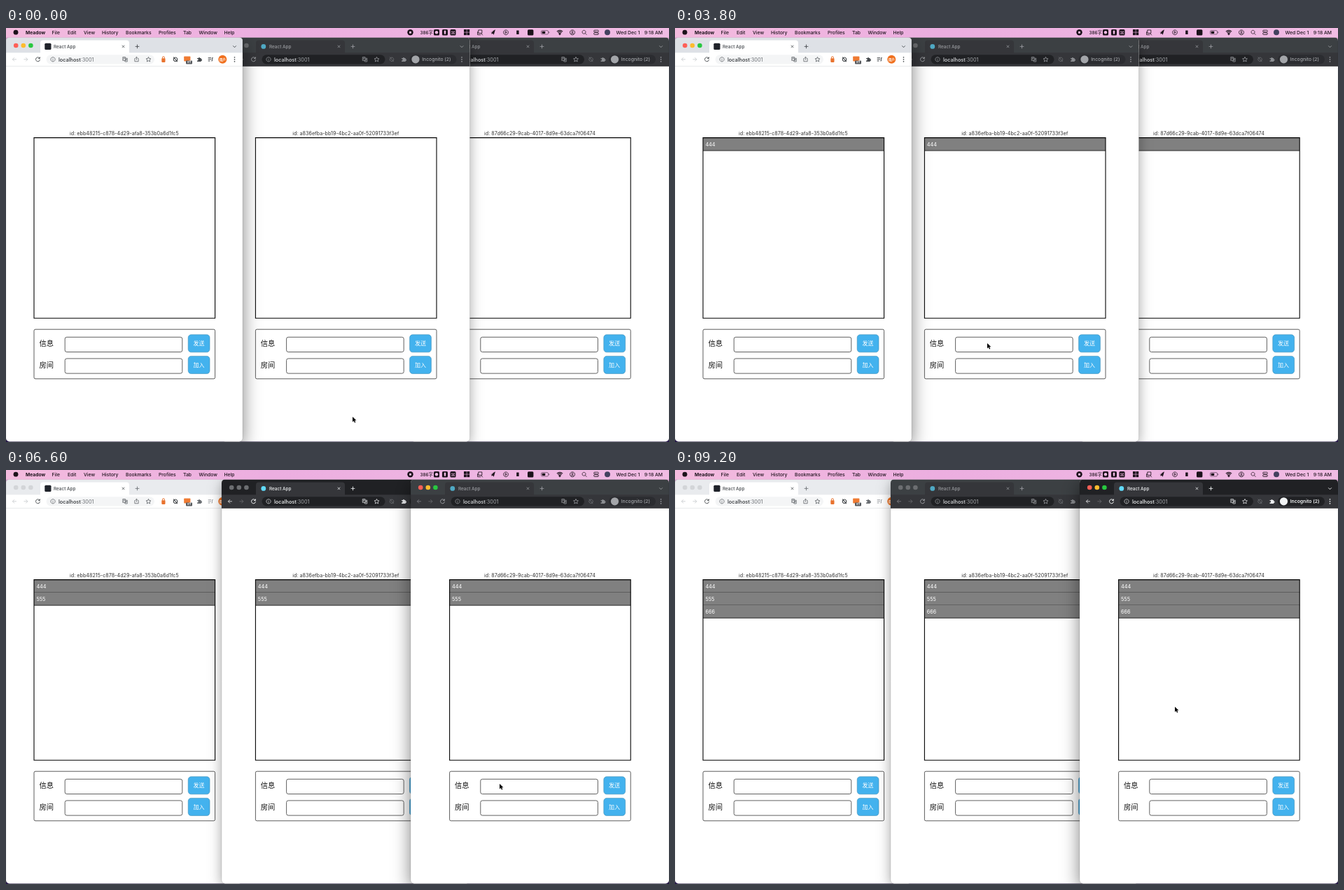
These frames come from a looping animation (947 by 591 pixels, 9.9 s). An HTML page with a canvas:

```html
<!DOCTYPE html>
<html lang="en">
<head>
<meta charset="utf-8">
<title>Chat rooms</title>
<style>
html, body { margin: 0; width: 100%; height: 100%; overflow: hidden; background: #fff; }
canvas { display: block; width: 947px; height: 591px; }
</style>
</head>
<body>
<canvas id="stage"></canvas>
<script>
const W = 947, H = 591, LOOP = 9900, STEP = 50;
const UI = 'Inter, Roboto, sans-serif';
const CJK = '"Noto Sans CJK SC", "Noto Sans CJK", sans-serif';
const canvas = document.getElementById('stage');
const dpr = window.devicePixelRatio || 1;
canvas.width = W * dpr;
canvas.height = H * dpr;
const ctx = canvas.getContext('2d');

// page: left offset of the content; times are in ms
const windows = [
  { x: 0, right: 338, page: 0, light: true, id: 'ebb48215-c878-4d29-afa8-353b0a6d1fc5',
    front: -1000, focus: 1100, blink: 1450, hide: 1750, keys: [1750, 1950, 2050], digit: '4', send: 2500 },
  { x: 308, right: 662.5, page: 316.4, id: 'a836efba-bb19-4bc2-aa0f-52091733f3ef',
    front: 3850, focus: 4250, blink: 4650, hide: 4650, keys: [4650, 4850, 4950], digit: '5', send: 5600 },
  { x: 578, right: 947, page: 593.6, id: '87d66c29-9cab-4017-8d9e-63dca7f06474',
    front: 6550, focus: 6950, blink: 7250, hide: 7550, keys: [7700, 7800, 7900], digit: '6', send: 8400 }
];
const suggestions = ['123', '1234', '33333333', '22'];

// pointer path: time, x, y
const path = [
  [0, 495, 555], [300, 420, 425], [400, 420, 425], [950, 121, 444], [1050, 121, 444],
  [1250, 112, 451], [2050, 112, 451], [2250, 270, 457], [2350, 270, 457], [2450, 272, 450.5],
  [3100, 272, 450.5], [3400, 320, 440], [3500, 320, 440], [3800, 446, 450], [5000, 446, 450],
  [5350, 592.5, 448.5], [6050, 592.5, 448.5], [6450, 705, 448], [8050, 705, 448],
  [8250, 866, 448], [9050, 866, 448], [9200, 714, 338], [LOOP, 714, 338]
];

const icons = {
  back: 'M13.5 8H3M8 3L3 8l5 5',
  forward: 'M2.5 8H13M8 3l5 5-5 5',
  reload: 'M12.4 4.8A5.4 5.4 0 1 0 13.4 8.6M13.2 1.8v4h-4',
  info: 'M8 2a6 6 0 1 0 .1 0M8 7.3v4M8 4.6v1',
  star: 'M8 2l1.8 4 4.2.4-3.2 2.9 1 4.2L8 11.3 4.2 13.5l1-4.2L2 6.4 6.2 6z',
  share: 'M5 6H3v8h10V6h-2M8 10V2M5 4.5l3-3 3 3',
  translate: 'M2 2h7v9H2zM9 5h5v9H8l-1-3M4 5h3M5.5 4v1L4 8.5M10 8h3M11.5 7.5L10 12',
  puzzle: 'M2.5 5H6a2 2 0 1 1 4 0h3v3.2a2 2 0 1 1 0 3.8v2.5H2.5V11a2 2 0 1 0 0-3.6z',
  slash: 'M8 3a5 5 0 1 0 .1 0M3 2l10 12',
  list: 'M2 4h8M2 8h8M2 12h5M12.5 4v8M12.5 4H15M10.5 12h2',
  chevron: 'M3.5 6L8 10.5 12.5 6',
  close: 'M4.2 4.2l7.6 7.6M11.8 4.2l-7.6 7.6',
  plus: 'M8 2.5v11M2.5 8h11',
  plane: 'M1 9L15 1l-4 13-3-4-2 3-1-4 6-5z',
  overlap: 'M4 2h9v8H4zM2 6v8h8M11 11l4 4',
  play: 'M8 1.5a6.5 6.5 0 1 0 .1 0M6.5 5v6l4.5-3z',
  user: 'M8 1.5a6.5 6.5 0 1 0 .1 0M8 4.5a2 2 0 1 0 .1 0M4 12q4-4 8 0',
  search: 'M7 2a5 5 0 1 0 .1 0M10.5 10.5L15 15',
  wifi: 'M1 6q7-6 14 0M3.5 8.5q4.5-4 9 0M6 11q2-2 4 0l-2 2.5z',
  toggles: 'M4 2h8a2.5 2.5 0 0 1 0 5H4a2.5 2.5 0 0 1 0-5M4 9h8a2.5 2.5 0 0 1 0 5H4a2.5 2.5 0 0 1 0-5M4 4.5h1M11 11.5h1'
};

function icon(name, x, y, color, size = 8.4, fill = false, weight = 1.5) {
  const shape = new Path2D(icons[name]);
  ctx.save();
  ctx.translate(x - size / 2, y - size / 2);
  ctx.scale(size / 16, size / 16);
  ctx.lineWidth = weight;
  ctx.strokeStyle = ctx.fillStyle = color;
  if (fill) ctx.fill(shape); else ctx.stroke(shape);
  ctx.restore();
}

function text(s, x, y, size, color, weight = 400, align = 'left', family = UI) {
  ctx.font = `${weight} ${size}px ${family}`;
  ctx.textAlign = align;
  ctx.fillStyle = color;
  ctx.fillText(s, x, y);
}

function rect(x, y, w, h, color) {
  ctx.fillStyle = color;
  ctx.fillRect(x, y, w, h);
}

function box(x, y, w, h, r, fill, stroke, line = 1) {
  ctx.beginPath();
  ctx.roundRect(x, y, w, h, r);
  if (fill) { ctx.fillStyle = fill; ctx.fill(); }
  if (stroke) { ctx.strokeStyle = stroke; ctx.lineWidth = line; ctx.stroke(); }
}

function dot(x, y, r, color) {
  ctx.beginPath();
  ctx.arc(x, y, r, 0, Math.PI * 2);
  ctx.fillStyle = color;
  ctx.fill();
}

const depth = (i, t) => t >= windows[i].front ? windows[i].front : -1e4 * (i + 1);
const stackAt = t => [0, 1, 2].sort((a, b) => depth(a, t) - depth(b, t));
const inside = (p, x, y, w, h) => p.x >= x && p.x <= x + w && p.y >= y && p.y <= y + h;

function pointerAt(t) {
  const i = Math.max(1, path.findIndex(k => k[0] > t));
  const [t0, x0, y0] = path[i - 1], [t1, x1, y1] = path[i];
  const k = (t - t0) / (t1 - t0), e = k * k * (3 - 2 * k);
  return { x: x0 + (x1 - x0) * e, y: y0 + (y1 - y0) * e };
}

function drawMenuBar() {
  const g = ctx.createLinearGradient(0, 0, W, 0);
  g.addColorStop(0, '#f3bbde');
  g.addColorStop(0.4, '#ecaee0');
  g.addColorStop(1, '#f1bce4');
  rect(0, 0, W, 13.5, g);
  const ink = '#1c121b', y = 8.7;
  dot(14, 6.2, 3.4, ink);
  text('Meadow', 28, y, 6.7, ink, 700);
  const menus = { File: 65.5, Edit: 88, View: 111, History: 137, Bookmarks: 171,
    Profiles: 218, Tab: 253, Window: 275.5, Help: 311.5 };
  for (const name in menus) text(name, menus[name], y, 6.8, ink, 500);

  dot(577.5, 6.3, 4.2, ink);
  box(576, 4.8, 3, 3, 0.6, '#f1bce4');
  text('386字', 591.5, y, 6.4, ink, 500, 'left', 'Inter, ' + CJK);
  for (const x of [615, 627, 638.5]) box(x - 4, 2, 8, 8.6, 1.6, ink);
  dot(615, 6.3, 2.2, '#f1bce4');
  box(625.8, 3.4, 2.4, 5.4, 1, '#f1bce4');
  text('⌘', 638.5, 8.6, 6.2, '#f1bce4', 500, 'center', '"DejaVu Sans", sans-serif');
  for (const [dx, dy] of [[0, 0], [4.4, 0], [0, 4.4], [4.4, 4.4]]) rect(654 + dx, 2 + dy, 3.8, 3.8, ink);
  icon('overlap', 677, 6.3, ink, 9);
  icon('plane', 695, 6.3, ink, 9, true);
  icon('play', 714, 6.3, ink, 8.4);
  box(729.2, 3.5, 3.4, 5.6, 0.3, ink);
  box(745, 2.2, 8.4, 8.2, 1.5, ink);
  box(764.5, 3.6, 10, 5.4, 1.4, null, '#6d4f69', 0.8);
  box(765.7, 4.7, 4.5, 3.2, 0.6, ink);
  rect(775.3, 5.3, 0.9, 2, '#6d4f69');
  icon('wifi', 791, 6.3, ink, 9.5, false, 2);
  icon('user', 809, 6.3, ink, 8.6);
  icon('search', 826, 6.3, ink, 8);
  icon('toggles', 843, 6.3, ink, 8.4);
  dot(859, 6.3, 4, '#43415f');
  text('Wed Dec 1', 871.5, y, 6.8, ink, 500);
  text('9:18 AM', 938, y, 6.8, ink, 500, 'right');
}

function drawChrome(w, front, lit) {
  const { x, right, light } = w;
  const strip = light ? (lit ? '#dee1e6' : '#e9ebee') : (lit ? '#202124' : '#3c4043');
  const bar = light ? '#ffffff' : '#35363a';
  const pill = light ? '#f4f5f6' : '#202124';
  const ink = light ? (lit ? '#45494d' : '#6d7175') : (lit ? '#f1f3f4' : '#9a9ca0');
  const soft = light ? '#5f6368' : (lit ? '#d4d6d9' : '#94979b');
  const faint = light ? '#c4c7ca' : '#6b6d71';

  rect(x, 13, right - x, 23, strip);
  const lamps = front ? ['#fe5f57', '#febc2e', '#28c840'] : Array(3).fill(light ? '#d3d5d8' : '#6c6e71');
  lamps.forEach((c, i) => dot(x + 14.2 + i * 10.6, 25, 3.3, c));

  box(x + 49, 17.5, 127, 22, 4, bar);
  rect(x, 35.3, right - x, 19.2, bar);
  if (light) box(x + 55.3, 21.8, 9.2, 9.2, 1.5, '#20232a');
  else dot(x + 59.8, 26.4, 3.4, lit ? '#61dafb' : '#4fa9c4');
  text('React App', x + 68, 28.8, 6.4, light ? '#45494d' : ink, 500);
  icon('close', x + 167.5, 26.4, light ? '#45494d' : ink, 7.2, false, 1.8);
  icon('plus', x + 187.5, 26.4, ink, 8.2, false, 1.7);
  icon('chevron', right - 11.5, 26.4, ink, 8, false, 1.9);

  icon('back', x + 12, 44.8, light ? faint : lit ? ink : '#85878b');
  icon('forward', x + 28.3, 44.8, faint);
  icon('reload', x + 45.5, 44.8, light ? '#4f5357' : ink, 8.8, false, 1.8);
  const pillEnd = light ? 212 : right - 121;
  box(x + 57.5, 38.2, pillEnd - x - 57.5, 13.2, 6.6, pill);
  icon('info', x + 67, 44.8, soft, 8.4);
  text('localhost', x + 75, 47.5, 7.3, light ? '#33363a' : lit ? '#f1f3f4' : '#d8dadd', 500);
  const hostEnd = x + 75 + ctx.measureText('localhost').width;
  text(':3001', hostEnd, 47.5, 7.3, light ? '#6b6f74' : '#a3a6aa');

  if (light) {
    icon('translate', 170, 44.8, soft, 8.6);
    icon('share', 186.5, 44.6, soft);
    icon('star', 203.5, 44.8, soft, 9.2);
    box(222.3, 43.3, 5.2, 5.6, 0.8, '#e8732f');
    box(223.4, 40.8, 3, 4, 1.4, null, '#e8732f', 1);
    icon('slash', 242, 44.8, '#3b3f43', 8.8, false, 2);
    box(254.2, 40.4, 9.2, 7.2, 0.8, '#ef7a32');
    box(257, 46.4, 9, 5.2, 1, '#55585c');
    text('off', 261.5, 50.4, 4, '#fff', 600, 'center');
    icon('puzzle', 276, 44.6, lit ? '#45494d' : '#6a6e72', 8.6, true);
    icon('list', 292, 44.8, lit ? '#45494d' : '#a0a4a8', 8.8, false, 1.8);
    dot(309.3, 44.8, 6, '#f0701e');
    text('用户', 309.3, 46.6, 4.6, '#fff', 700, 'center', CJK);
  } else {
    icon('translate', right - 150, 44.8, soft, 8.6);
    icon('star', right - 133, 44.8, soft, 9.2);
    icon('slash', right - 111.5, 44.8, '#6f7175', 8.8);
    icon('puzzle', right - 94.5, 44.6, lit ? '#eceef0' : '#8b8d91', 8.6, true);
    box(right - 86, 38.2, 67, 13.2, 6.6, lit ? '#202124' : '#2b2c30');
    dot(right - 77.5, 44.8, 5.6, lit ? '#f1f3f4' : '#a3a5a9');
    text('Incognito (2)', right - 68.3, 47.4, 6.8, lit ? '#f1f3f4' : '#a3a5a9', lit ? 600 : 500);
  }
  for (const dy of [-3, 0, 3]) dot(right - 11.5, 44.8 + dy, 0.85, ink);
  rect(x, 54, right - x, 0.6, light ? '#dadce0' : '#2a2b2e');
}

function typed(w, t) {
  return t >= w.send ? '' : w.digit.repeat(w.keys.filter(k => t >= k).length);
}

function drawPage(w, t, hot) {
  const p = w.page;
  text('id: ' + w.id, p + 168.9, 153, 7.2, '#333', 400, 'center');

  windows.filter(o => t >= o.send).forEach((o, i) => {
    const y = 156.8 + i * 18.1;
    rect(p + 40, y, 258.6, 18.2, '#808080');
    rect(p + 40, y + 17.8, 258.6, 0.9, '#1d1d1d');
    text(o.digit.repeat(3), p + 43.4, y + 11.8, 7.3, '#fff');
  });
  box(p + 40, 156.6, 258.6, 257.6, 0, null, '#000', 1.1);

  box(p + 40, 430.2, 258.6, 70.6, 2, null, '#4a4a4a', 0.9);
  [['信息', '发送'], ['房间', '加入']].forEach(([label, action], i) => {
    const y = 441.3 + i * 30.6;
    text(label, p + 47.4, y + 12.9, 10.3, '#111', 500, 'left', CJK);
    box(p + 84.2, y, 167.6, 21.2, 2.6, '#fff', '#505050', 0.9);
    box(p + 260.2, y - 3.5, 30.8, 25, 4.2, hot && !i ? '#1181b8' : '#43b2ee', hot && !i ? '#0c6a99' : '#3d8db6', 0.6);
    text(action, p + 275.5, y + 11.8, 8, '#fff', 400, 'center', CJK);
  });

  const value = typed(w, t);
  text(value, p + 89.9, 454.8, 7.9, '#111');
  const caretOn = t >= w.focus && t < w.send && !(t >= w.blink && t < w.keys[0]);
  if (caretOn) rect(p + 90.2 + ctx.measureText(value).width, 447, 0.7, 10, '#000');
}

function drawSuggestions(w, t) {
  if (t < w.focus || t >= w.keys[0]) return;
  const x = w.page + 84;
  ctx.save();
  ctx.globalAlpha = Math.min(1, (t - w.focus + 50) / 200);
  ctx.shadowColor = 'rgba(0,0,0,.35)';
  ctx.shadowBlur = 3 * dpr;
  box(x, 463.3, 168, 84.6, 1.6, w.light ? '#fff' : '#272b2e');
  ctx.shadowColor = 'transparent';
  suggestions.forEach((s, i) => text(s, x + 6.6, 479.8 + i * 18.95, 6.9, w.light ? '#202124' : '#e8eaed', 600));
  ctx.restore();
}

function drawWindow(w, t, front, lit, hot) {
  ctx.save();
  ctx.shadowColor = front ? 'rgba(0,0,0,.5)' : 'rgba(0,0,0,.36)';
  ctx.shadowBlur = (front ? 26 : 18) * dpr;
  ctx.shadowOffsetY = (front ? 7 : 4) * dpr;
  box(w.x, 13.4, w.right - w.x, 577, 5, '#fff');
  ctx.restore();
  ctx.save();
  ctx.beginPath();
  ctx.roundRect(w.x, 13.4, w.right - w.x, 577, 5);
  ctx.clip();
  drawChrome(w, front, lit);
  drawPage(w, t, hot);
  drawSuggestions(w, t);
  ctx.restore();
  box(w.x, 13.4, w.right - w.x, 577, 5, null, 'rgba(0,0,0,.22)', 0.5);
}

function drawPointer(p, kind) {
  ctx.save();
  ctx.translate(p.x, p.y);
  ctx.lineJoin = 'round';
  if (kind === 'text') {
    const beam = new Path2D('M-1.8 -4.3Q0 -4.3 0 -3.2Q0 -4.3 1.8 -4.3M0 -3.2V3.2M-1.8 4.3Q0 4.3 0 3.2Q0 4.3 1.8 4.3');
    ctx.lineWidth = 0.9;
    ctx.strokeStyle = '#222';
    ctx.stroke(beam);
  } else {
    const hand = kind === 'hand';
    const shape = new Path2D(hand
      ? 'M-1 1Q0 -.6 .9 1V4L3.8 4.7Q4.6 5 4.5 6.2L3.8 9.3H-.8L-3.2 6.3Q-3.4 5 -2.2 5.3L-1 6.3Z'
      : 'M0 0V7.4L1.8 5.8 3 8.5 4.3 7.9 3.1 5.3H5.4Z');
    ctx.lineWidth = hand ? 0.9 : 1.3;
    ctx.strokeStyle = hand ? '#111' : '#fff';
    ctx.fillStyle = hand ? '#fff' : '#000';
    ctx.stroke(shape);
    ctx.fill(shape);
  }
  ctx.restore();
}

function draw(t) {
  ctx.setTransform(dpr, 0, 0, dpr, 0, 0);
  const desk = ctx.createLinearGradient(0, 0, 0, H);
  desk.addColorStop(0, '#ecaee0');
  desk.addColorStop(1, '#2c1b57');
  rect(0, 0, W, H, desk);

  const stack = stackAt(t), top = stack[2];
  const lit = stackAt(t - 100)[2];
  const p = pointerAt(t), live = windows[lit];
  const onButton = inside(p, live.page + 260, 437.5, 31, 25.5);
  const onInput = inside(p, live.page + 84, 441, 168, 22);
  for (const i of stack) drawWindow(windows[i], t, i === top, i === lit, i === lit && onButton);
  drawMenuBar();

  // the pointer hides while typing
  const hidden = windows.some(w => t >= w.hide && t <= w.keys[2]);
  if (!hidden) drawPointer(p, onButton ? 'hand' : onInput ? 'text' : 'arrow');
}

const start = performance.now();
function tick() {
  const t = (performance.now() - start) % LOOP;
  draw(Math.floor(t / STEP) * STEP);
  requestAnimationFrame(tick);
}
tick();
</script>
</body>
</html>
```
